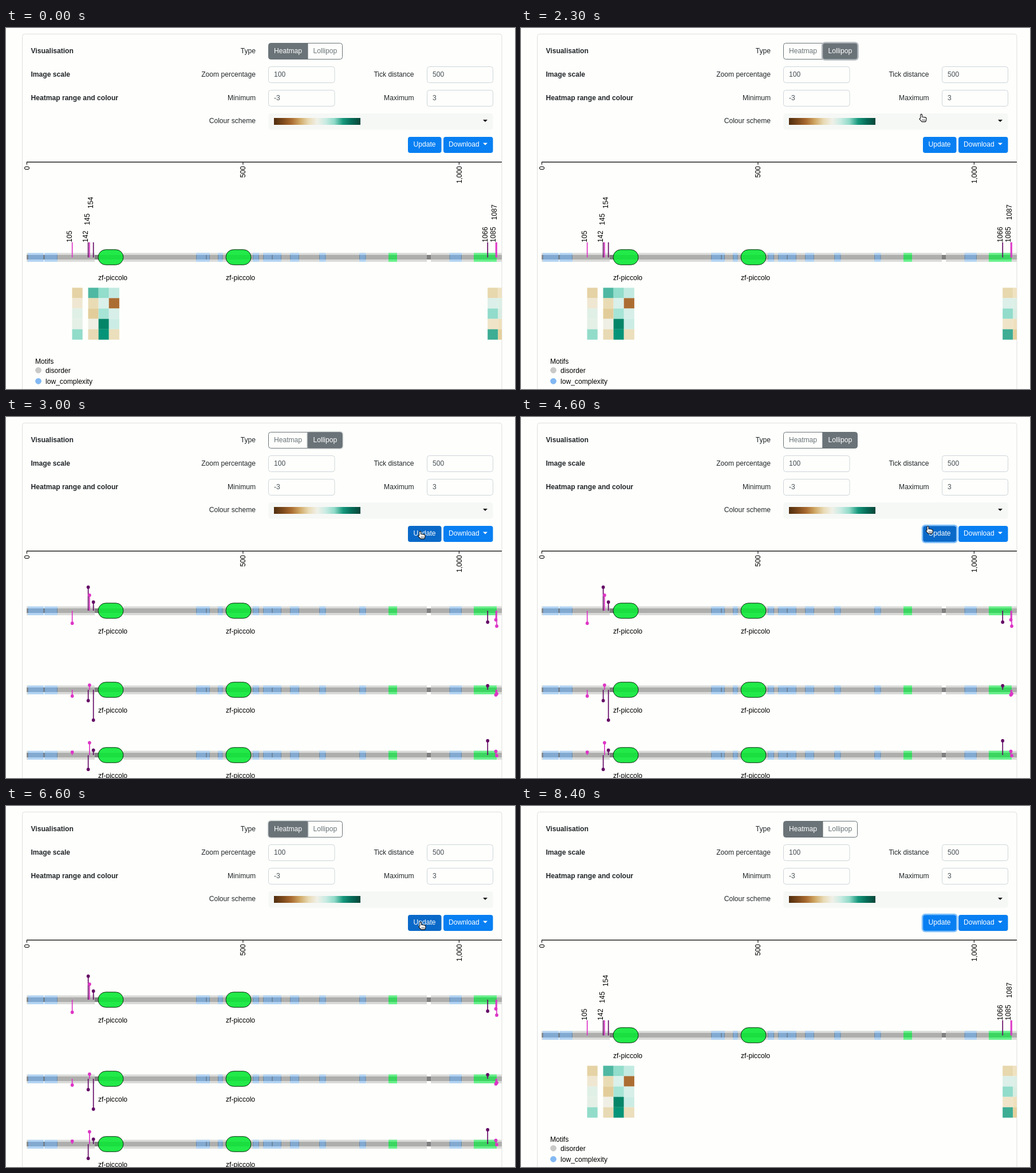
These frames come from a looping animation (889 by 630 pixels, 8.5 s). An HTML page with a canvas:

```html
<!DOCTYPE html>
<html lang="en">
<head>
<meta charset="utf-8">
<title>Domain viewer</title>
<style>
html, body { margin: 0; width: 100%; height: 100%; overflow: hidden; background: #fefffc; }
canvas { display: block; }
</style>
</head>
<body>
<canvas id="stage" width="889" height="630"></canvas>
<script>
const ctx = document.getElementById('stage').getContext('2d');
const LOOP = 8500, STEP = 100;
const FONT = '12.1px "Liberation Sans", Arial, sans-serif';
const BG = '#fefffc', GREY = '#6a7378', PINK = '#dd36c6', PURPLE = '#650b66';

// Controls as x, y, width, height
const HEATMAP = [458.5, 26.5, 68.5, 28];
const LOLLIPOP = [527, 26.5, 60.5, 28];
const SELECT = [458.5, 149, 392, 28.5];
const UPDATE = [702, 190, 58.5, 28];
const DOWNLOAD = [764, 190, 86.5, 28];
const FIELDS = [
  [[458.5, 67.5, 115.5, 28], '100'],
  [[735.5, 67.5, 115, 28], '500'],
  [[458.5, 108.5, 115.5, 28], '-3'],
  [[735.5, 108.5, 115, 28], '3']
];

// Pointer moves: start, end, target x, target y
const START = [677, 117];
const MOVES = [
  [700, 1300, 571, 44], [1400, 1500, 570, 43],
  [2000, 2300, 702, 157], [2300, 2700, 726, 206],
  [4500, 5200, 497, 44], [5500, 5900, 727, 209],
  [7500, 7800, 221, 18]
];
const HAND = new Path2D('M-4.2 .6V-5Q-4.2-6.6-2.8-6.6Q-1.4-6.6-1.4-5V-1.8L3.6-1.1Q6-.8 6 1.4Q6 4.6 4.4 6.6H-1.8L-5.8 2.4Q-6.8 .6-4.2 .6Z');
const ARROW = new Path2D('M-4.5-7.3V5.2L-1.7 2.6L.4 7.4L2.5 6.5L.5 1.9H4.4Z');
const BEAM = new Path2D('M-3-7H3M0-7V7M-3 7H3');

const SITES = [105, 142, 145, 154, 1066, 1085, 1087];
const SITE_LABEL_Y = [374, 374, 344, 315, 374, 374, 335];
const DARK_SITES = [142, 154, 1066];
const TRACKS = [
  [338, [22, -41, -27, -15, 20, 16, 27]],
  [476, [11, 19, -8, 53, -7, 9, 7]],
  [590, [-5, 25, -21.5, -8.5, -25, -6.5, 1]]
];
const DISORDER = [[90, 155], [205, 735], [742, 866]];
const LOW = [[38, 66], [67, 90], [332, 350], [350, 356], [370, 378.5], [431, 442], [449, 465],
  [465, 481], [496, 512], [547, 558.5], [617, 628.5], [774.5, 796]];
const COILS = [[668, 683], [817, 857]];
const CELLS = [
  [115.5, '#e5d3a5 #efe7d2 #e0f0e7 #e4efe6 #92dcca'],
  [143.5, '#4fb8a2 #e9dcb5 #e2cd9a #efefe6 #e8dab4'],
  [161.6, '#92ddcb #daf0ea #a6e4d6 #058568 #059478'],
  [179.7, '#c3eae1 #ac6d33 #d7efe8 #cbece4 #ecdfbc'],
  [841.2, '#e7d8ae #dcefe9 #92dccb #f0e4c8 #3dad94'],
  [859.3, '#efe2c0 #dcefe6 #d8ece2 #efe0bd #e5d09c']
];
const SCHEME = ['#4f2e0f', '#7b481b', '#a96b30', '#d0a865', '#e8dab4', '#f0f0e8',
  '#c8ebe2', '#8fdac8', '#17987c', '#066b57', '#0a4739'];

const siteX = n => 36.4 + n * 0.755;
const siteColor = n => DARK_SITES.includes(n) ? PURPLE : PINK;

function text(str, x, y, color = '#212529', align = 'left', bold = false) {
  ctx.font = (bold ? 'bold ' : '') + FONT;
  ctx.fillStyle = color;
  ctx.textAlign = align;
  ctx.fillText(str, x, y);
}

function upright(str, x, y, align) {
  ctx.save();
  ctx.translate(x, y);
  ctx.rotate(-Math.PI / 2);
  text(str, 0, 0, '#000', align);
  ctx.restore();
}

function fill(x, y, w, h, color) {
  ctx.fillStyle = color;
  ctx.fillRect(x, y, w, h);
}

function line(x1, y1, x2, y2, color, width = 1) {
  ctx.strokeStyle = color;
  ctx.lineWidth = width;
  ctx.beginPath();
  ctx.moveTo(x1, y1);
  ctx.lineTo(x2, y2);
  ctx.stroke();
}

function box([x, y, w, h], r, color, border) {
  ctx.beginPath();
  ctx.roundRect(x, y, w, h, r);
  if (color) { ctx.fillStyle = color; ctx.fill(); }
  if (border) { ctx.strokeStyle = border; ctx.lineWidth = 1; ctx.stroke(); }
}

function dot(x, y, r, color) {
  ctx.fillStyle = color;
  ctx.beginPath();
  ctx.arc(x, y, r, 0, 7);
  ctx.fill();
}

function caret(x, y, color) {
  ctx.fillStyle = color;
  ctx.beginPath();
  ctx.moveTo(x - 4, y);
  ctx.lineTo(x + 4, y);
  ctx.lineTo(x, y + 4);
  ctx.fill();
}

function ring([x, y, w, h], color, alpha = 1) {
  ctx.globalAlpha = alpha;
  ctx.strokeStyle = color;
  ctx.lineWidth = 2.5;
  ctx.beginPath();
  ctx.roundRect(x - 1, y - 1, w + 2, h + 2, 5);
  ctx.stroke();
  ctx.globalAlpha = 1;
}

function pointer(t) {
  let [x, y] = START;
  for (const [from, to, tx, ty] of MOVES) {
    const u = Math.min(1, Math.max(0, (t - from) / (to - from)));
    const e = u * u * (3 - 2 * u);
    x += (tx - x) * e;
    y += (ty - y) * e;
  }
  return [x, y];
}

function inside(t, [x, y, w, h]) {
  if (t < 700 || t >= 8000) return false;
  const p = pointer(t), px = p[0] - 2, py = p[1] - 6;
  return px >= x && px <= x + w && py >= y && py <= y + h;
}

const hovered = (t, rect) => inside(t, rect) && inside(t - STEP, rect);

function typeButton(rect, label, on, corners) {
  box(rect, corners, on ? GREY : BG, GREY);
  text(label, rect[0] + 9.5, 44, on ? '#fff' : GREY);
}

function controls(t) {
  const lolly = t >= 1900 && t < 5500;
  text('Visualisation', 43.5, 44, undefined, 'left', true);
  text('Image scale', 43.5, 85, undefined, 'left', true);
  text('Heatmap range and colour', 43.5, 126, undefined, 'left', true);
  [['Type', 44], ['Zoom percentage', 85], ['Minimum', 126], ['Colour scheme', 166]]
    .forEach(([s, y]) => text(s, 436, y, undefined, 'right'));
  text('Tick distance', 712.5, 85, undefined, 'right');
  text('Maximum', 712.5, 126, undefined, 'right');

  typeButton(HEATMAP, 'Heatmap', !lolly || hovered(t, HEATMAP), [4, 0, 0, 4]);
  typeButton(LOLLIPOP, 'Lollipop', lolly || hovered(t, LOLLIPOP), [0, 4, 4, 0]);
  if (t >= 1900 && t < 3500) ring(LOLLIPOP, '#b3b9bd', t < 2900 ? 1 : 0.35);
  if (t >= 5500 && t < 7000) ring(HEATMAP, '#b3b9bd', t < 6600 ? 1 : 0.35);

  for (const [rect, value] of FIELDS) {
    box(rect, 4, BG, '#ced4da');
    text(value, rect[0] + 9.5, rect[1] + 17.5, '#495057');
  }

  box(SELECT, 4, hovered(t, SELECT) ? '#e6e9ea' : '#f6f8f6');
  const g = ctx.createLinearGradient(468, 0, 619, 0);
  SCHEME.forEach((c, i) => g.addColorStop(i / (SCHEME.length - 1), c));
  fill(468, 157, 151, 12, g);
  caret(837, 160, '#111');

  box(UPDATE, 4, hovered(t, UPDATE) ? '#0a69c8' : '#087ff2');
  if ((t >= 3500 && t < 5400) || t >= 7000) ring(UPDATE, '#85c1f8');
  text('Update', 731, 207, '#fff', 'center');
  box(DOWNLOAD, 4, '#087ff2');
  text('Download', 773, 207, '#fff');
  caret(837, 200.5, '#fff');
}

function axis() {
  line(36, 234, 866, 234, '#222', 1.3);
  [[0, '0'], [500, '500'], [1000, '1,000']].forEach(([n, s]) => {
    const x = siteX(n);
    line(x, 234, x, 238.5, '#222', 1.3);
    upright(s, x + 4.2, 241, 'right');
  });
}

function segment([a, b], y, outer, inner) {
  fill(a, y - 7.5, b - a, 15.5, outer);
  fill(a, y - 4, b - a, 8, inner);
}

function track(y) {
  fill(36, y - 4, 830, 8, '#808080');
  DISORDER.forEach(s => segment(s, y, '#dadbd9', '#aeafad'));
  segment([36, 38], y, '#dadbd9', '#8e8e8e');
  LOW.forEach(s => {
    segment(s, y, '#b3d3f2', '#82a9d0');
    fill(s[0], y - 4, 1, 8, '#70879d');
    fill(s[1] - 1, y - 4, 1, 8, '#70879d');
  });
  COILS.forEach(s => segment(s, y, '#68f08b', '#3bd560'));
}

function domains(y) {
  [161, 384].forEach(x => {
    box([x, y - 13.2, 44, 26.5], 13.2, '#22ea49');
    fill(x + 1, y - 4, 42, 8, '#1bde40');
    box([x, y - 13.2, 44, 26.5], 13.2, null, '#0b2a10');
    text('zf-piccolo', x, y + 40, '#000');
  });
}

function heatmapView() {
  track(400);
  SITES.forEach((n, i) => {
    const x = siteX(n);
    line(x, 374, x, 400.5, siteColor(n), 1.7);
    upright(String(n), x - 0.3, SITE_LABEL_Y[i], 'left');
  });
  domains(400);
  CELLS.forEach(([x, colors]) => colors.split(' ').forEach((c, i) =>
    fill(x, 453.3 + i * 18.1, 18.2, 18.2, c)));
  text('Motifs', 51, 586, '#000');
  dot(56.5, 597.3, 5.4, '#c9c9c8');
  text('disorder', 69, 601.5, '#000');
  dot(56.5, 616.3, 5.4, '#82b8f3');
  text('low_complexity', 69, 620.5, '#000');
}

function lollipopView() {
  TRACKS.forEach(([y, heights]) => {
    track(y);
    SITES.forEach((n, i) => {
      const x = siteX(n), end = y + heights[i];
      line(x, y, x, end, siteColor(n), 1.7);
      dot(x, end, 2.9, siteColor(n));
    });
    domains(y);
  });
}

function cursor(t) {
  if (t < 700 || t >= 8000) return;
  const onField = FIELDS.some(([rect]) => inside(t, rect));
  const onButton = [HEATMAP, LOLLIPOP, SELECT, UPDATE, DOWNLOAD].some(r => inside(t, r));
  ctx.save();
  ctx.translate(...pointer(t));
  ctx.lineJoin = 'round';
  ctx.strokeStyle = '#111';
  ctx.lineWidth = 1.1;
  const shape = onButton ? HAND : onField ? BEAM : ARROW;
  if (!onField) { ctx.fillStyle = '#fff'; ctx.fill(shape); }
  ctx.stroke(shape);
  if (onButton) {
    ctx.lineWidth = 0.8;
    ctx.stroke(new Path2D('M-.8 2.5V5M1.2 2.5V5M3.2 2.5V5'));
  }
  ctx.restore();
}

function draw(t) {
  fill(0, 0, 889, 630, BG);
  box([28.5, 10.5, 837.5, 640], 4, null, '#dfe0dd');
  controls(t);
  ctx.save();
  ctx.beginPath();
  ctx.rect(0, 225, 866, 405);
  ctx.clip();
  axis();
  if (t >= 3000 && t < 6700) lollipopView();
  else heatmapView();
  ctx.restore();
  cursor(t);
}

const origin = performance.now();
function tick() {
  const t = (performance.now() - origin) % LOOP;
  draw(Math.floor(t / STEP) * STEP);
  requestAnimationFrame(tick);
}
tick();
</script>
</body>
</html>
```
